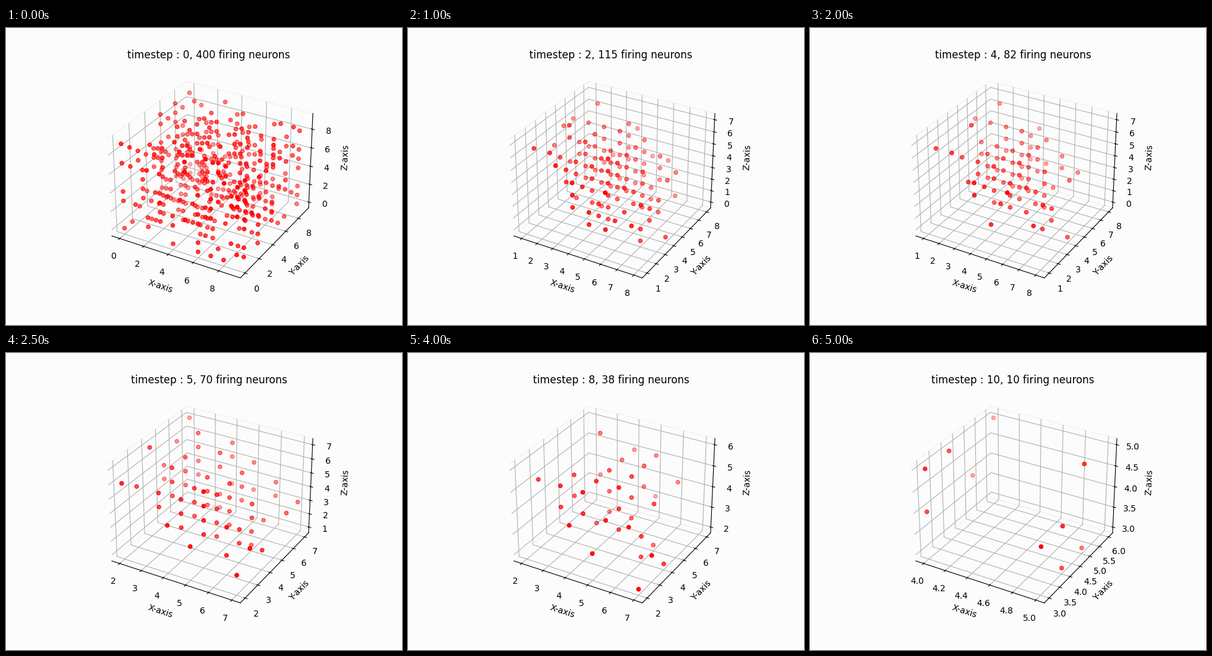
These frames come from a looping animation (640x480 px, 5.5 s). A matplotlib script:

```python
import numpy as np
import matplotlib.pyplot as plt
from matplotlib.animation import FuncAnimation

BG = "#fcfcfc"
EDGE = "#f2f2f2"
SIDE = 10

# Firing count, lowest and highest corner of the active box per timestep.
STEPS = [
    (400, (0, 0, 0), (9, 9, 9)),
    (123, (1, 1, 1), (8, 8, 8)),
    (115, (1, 1, 0), (8, 8, 7)),
    (108, (1, 2, 1), (7, 8, 7)),
    (82, (1, 1, 0), (8, 8, 7)),
    (70, (2, 2, 1), (7, 7, 7)),
    (60, (2, 2, 1), (7, 7, 7)),
    (48, (2, 2, 2), (7, 7, 6)),
    (38, (2, 2, 2), (7, 7, 6)),
    (20, (3, 3, 2), (6, 6, 6)),
    (10, (4, 3, 3), (5, 6, 5)),
]

rng = np.random.default_rng(7)
lattice = np.indices((SIDE,) * 3).reshape(3, -1).T
noise = rng.normal(0, 0.6, len(lattice))


def firing(step):
    """Pick the cells that fire: random at first, then drawn to the core."""
    count, low, high = STEPS[step]
    if step == 0:
        return lattice[rng.choice(len(lattice), count, replace=False)]

    inside = np.all((lattice >= low) & (lattice <= high), axis=1)
    cells = lattice[inside]
    offset = cells - (np.array(low) + high) / 2
    # Activity gathers around a tilted plane through the core.
    tilt = np.abs(offset[:, 0] + offset[:, 2])
    score = 0.5 * np.linalg.norm(offset, axis=1) + 0.4 * tilt + noise[inside]

    # Every face of the box keeps its strongest cell.
    for axis in range(3):
        for bound in (low[axis], high[axis]):
            face = np.flatnonzero(cells[:, axis] == bound)
            score[face[np.argmin(score[face])]] -= 100
    return cells[np.argsort(score)[:count]]


states = [firing(step) for step in range(len(STEPS))]

fig = plt.figure(figsize=(6.4, 4.8), dpi=100, facecolor=BG)
ax = fig.add_subplot(projection="3d")


def draw(step):
    ax.clear()
    ax.set_facecolor(BG)
    for axis in (ax.xaxis, ax.yaxis, ax.zaxis):
        axis.pane.set(facecolor=BG, edgecolor=EDGE, alpha=1)
    cells = states[step]
    ax.scatter(*cells.T, color="red")
    ax.set_title(f"timestep : {step}, {len(cells)} firing neurons")
    ax.set_xlabel("X-axis")
    ax.set_ylabel("Y-axis")
    ax.set_zlabel("Z-axis")


anim = FuncAnimation(fig, draw, frames=len(STEPS), init_func=lambda: None,
                     interval=500, repeat=True, repeat_delay=0)
plt.show()
```
